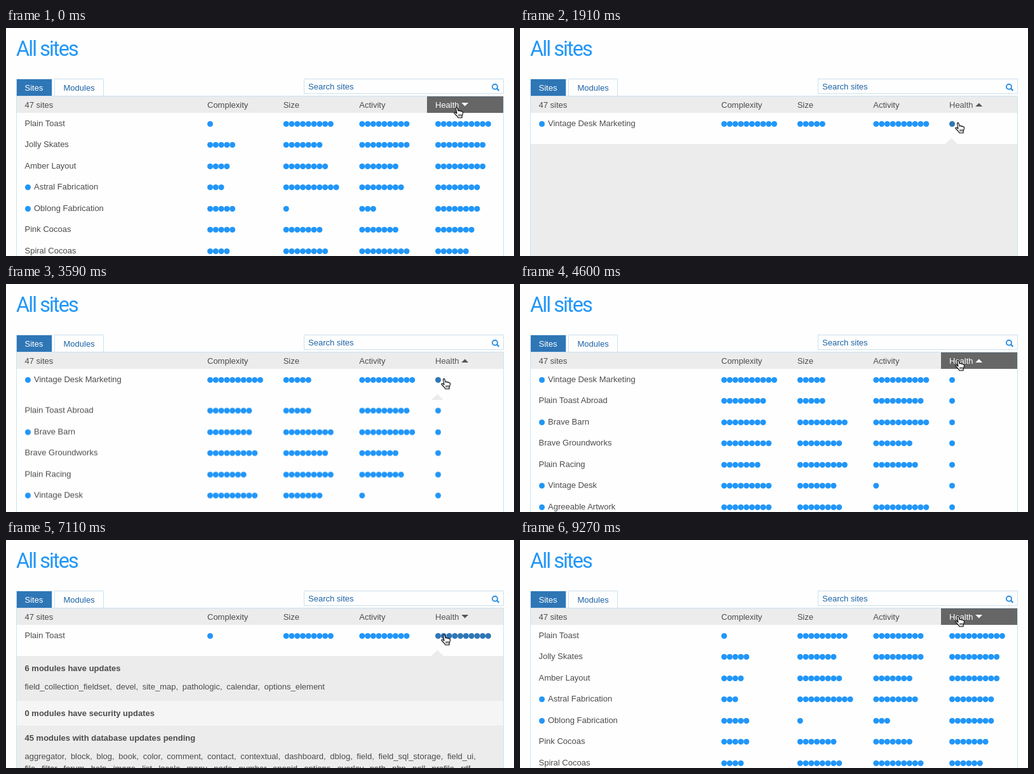
Animation, 800 px wide and 360 px high, one loop 9930 ms. Source, as an HTML page:

```html
<!DOCTYPE html>
<html lang="en">
<head>
<meta charset="utf-8">
<title>All sites</title>
<style>
html, body { margin: 0; width: 100%; height: 100%; overflow: hidden; background: #fefefe; }
svg { display: block; width: 800px; height: 360px; }
text { font: 13px "Liberation Sans", Arial, sans-serif; fill: #4c4c4c; white-space: pre; }
.title { font: 32.5px Roboto, sans-serif; letter-spacing: -1.95px; fill: #2196f8; }
.link { fill: #1c64a6; }
.white { fill: #fff; }
.line { fill: none; stroke: #cbe1f0; }
.dot { fill: #2196f8; }
.bold { font-weight: bold; }
.modules { word-spacing: 3px; }

/* Every part shares one 9930 ms loop and changes in hard steps. */
.move { animation: 9930ms step-end infinite; }
.asc { animation-name: asc; }
.desc { animation-name: desc; }
.active { animation-name: active; }
.label { animation-name: label; }
.rest { animation-name: rest; }
.panel { animation-name: panel; }
.notch { animation-name: notch; }
.updates { animation-name: updates; }
.report { animation-name: report; }
.hot { animation-name: hot; }
.cursor { animation-name: cursor; }

@keyframes asc { 0%, 51.762% { opacity: 0 } 7.855% { opacity: 1 } 100% { opacity: 0 } }
@keyframes desc { 0%, 51.762% { opacity: 1 } 7.855% { opacity: 0 } 100% { opacity: 1 } }
@keyframes active {
  0%, 45.821%, 92.749%, 100% { opacity: 1 }
  11.38%, 59.617% { opacity: 0 }
}
@keyframes label {
  0%, 45.821%, 92.749%, 100% { fill: #fff }
  11.38%, 59.617% { fill: #555 }
}
@keyframes rest {
  0%, 36.757%, 83.082%, 100% { opacity: 1; transform: none }
  19.235%, 67.372% { opacity: 0; transform: none }
  36.153% { opacity: 1; transform: translateY(15.5px) }
}
@keyframes panel {
  0%, 36.153%, 83.082%, 100% { opacity: 0 }
  19.235%, 67.372% { opacity: 1 }
}
@keyframes notch {
  0%, 36.757%, 83.082%, 100% { opacity: 0 }
  19.235%, 67.372% { opacity: 1 }
}
@keyframes updates { 0%, 36.153%, 100% { opacity: 0 } 23.464% { opacity: 1 } }
@keyframes report { 0%, 83.082%, 100% { opacity: 0 } 71.601% { opacity: 1 } }
@keyframes hot {
  0%, 44.612%, 92.145%, 100% { fill: #2196f8 }
  12.588%, 60.725% { fill: #2f76b6 }
}
@keyframes cursor {
  0% { transform: translate(705px, 125px) }
  10.775% { transform: translate(701px, 130px) }
  11.38% { transform: translate(697px, 135px) }
  11.984% { transform: translate(693px, 140px) }
  12.588% { transform: translate(689px, 145px) }
  13.192% { transform: translate(686px, 150px) }
  15.005%, 60.725% { transform: translate(685px, 149px) }
  44.612%, 60.121% { transform: translate(685px, 142px) }
  45.217%, 59.617% { transform: translate(685px, 135px) }
  45.821%, 59.013% { transform: translate(685px, 127px) }
  46.324%, 93.353% { transform: translate(685px, 120px) }
  92.145% { transform: translate(685px, 139px) }
  92.749% { transform: translate(685px, 130px) }
  100% { transform: translate(705px, 125px) }
}
</style>
</head>
<body>
<svg viewBox="0 0 800 360">
  <text class="title" x="16" y="44">All sites</text>

  <rect x="17" y="81" width="55" height="27" fill="#2f76b6"/>
  <path class="line" d="M16.5 360V80.5H72.5V107.5M76.5 107.5V80.5H153.5V107.5M16 107.5H783.5V360"/>
  <text class="white" x="29.5" y="99">Sites</text>
  <text class="link" x="90.5" y="99">Modules</text>

  <rect class="line" x="469.5" y="80.5" width="314" height="23"/>
  <text class="link" x="476" y="97">Search sites</text>
  <path d="M773 95.5L776.3 98.8" stroke="#2a8fe6" stroke-width="2.4"/>
  <circle cx="770" cy="92.7" r="4" fill="none" stroke="#2a8fe6" stroke-width="1.9"/>

  <rect x="17" y="108" width="766" height="26" fill="#ececec"/>
  <rect class="move active" x="663" y="108" width="120" height="26" fill="#666"/>
  <text x="29.5" y="126">47 sites</text>
  <text x="317" y="126">Complexity</text>
  <text x="436.7" y="126">Size</text>
  <text x="556.3" y="126">Activity</text>
  <g class="move label">
    <text style="fill:inherit" x="676" y="126">Health</text>
    <path class="move desc" d="M717.2 118H728.2L722.7 123.4Z"/>
    <path class="move asc" d="M717.2 124H728.2L722.7 118.6Z"/>
  </g>

  <g id="desc" class="move desc"></g>
  <g id="asc" class="move asc"></g>

  <path class="move notch" d="M670 183L679.5 173.7L689 183Z" fill="#ececec"/>
  <rect class="move panel" x="17" y="183" width="766" height="177" fill="#ececec"/>
  <g id="updates" class="move updates"></g>
  <g id="report" class="move report">
    <rect x="17" y="254" width="766" height="39" fill="#f5f5f5"/>
  </g>

  <g class="move cursor" stroke="#000" stroke-linejoin="round">
    <path fill="#fff" stroke-width="1.1" d="M3.5 2C3.3 .2 5.4 .2 5.9 1.6L7.2 6C8 5 9.6 5.2 9.8 6.3C10.6 5.5 12 5.8 12.2 6.9C13.4 6.4 14.5 7 14.5 8.4C14.5 11 14 12 13.2 13.5L13 16.7H6.8C6.2 14.5 4.5 13 2.8 11.5L1 9.6C.3 8.6 1.4 7.6 2.6 8.2L5 10Z"/>
    <path fill="none" stroke-width=".9" d="M8 11v3.5M10 11v3.5M12 11v3.5"/>
  </g>
</svg>
<script>
const NS = 'http://www.w3.org/2000/svg';
const left = 29.5;
const columns = [317, 436.7, 556.3, 676];

// Name (a leading * marks a flagged site), then complexity, size, activity, health.
const lists = {
  desc: [
    ['Plain Toast', 1, 9, 9, 10],
    ['Jolly Skates', 5, 7, 9, 9],
    ['Amber Layout', 4, 8, 7, 9],
    ['*Astral Fabrication', 3, 10, 8, 8],
    ['*Oblong Fabrication', 5, 1, 3, 8],
    ['Pink Cocoas', 5, 7, 7, 7],
    ['Spiral Cocoas', 4, 8, 9, 6]
  ],
  asc: [
    ['*Vintage Desk Marketing', 10, 5, 10, 1],
    ['Plain Toast Abroad', 8, 5, 9, 1],
    ['*Brave Barn', 8, 9, 10, 1],
    ['Brave Groundworks', 9, 8, 7, 1],
    ['Plain Racing', 7, 9, 8, 1],
    ['*Vintage Desk', 9, 7, 1, 1],
    ['*Agreeable Artwork', 9, 8, 10, 1]
  ]
};

const updates = [
  'colorbox, table_element, registration, mimemail, libraries, pathologic, calendar, spamspan, seo_checklist, menu_block,',
  'views, panels_extra_layouts, media, linkit, recaptcha, filefield_paths, ds, pathauto_persist, config_perms, uuid, varnish,',
  'field_group, webform_validation, link, xmlsitemap, site_map, date, field_collection, metatag, field_collection_fieldset,',
  'field_collection_table, entity, node_clone, pathauto, honeypot, memcache, transliteration, cck, mailsystem,',
  'options_element, phone, flexslider, plupload, hierarchical_select, context, features, views_field_view, mediaelement,',
  'google_analytics, devel, select_or_other, cas_attributes, captcha, views_data_export, auto_image_style, views_accordion,',
  'checklistapi, wysiwyg_codemagic, entitycache, filefield_sources, jquery_update'
];
const pending = [
  'aggregator, block, blog, book, color, comment, contact, contextual, dashboard, dblog, field, field_sql_storage, field_ui,',
  'file, filter, forum, help, image, list, locale, menu, node, number, openid, options, overlay, path, php, poll, profile, rdf,'
];

function add(parent, tag, attrs, content = '') {
  const el = document.createElementNS(NS, tag);
  for (const key in attrs) el.setAttribute(key, attrs[key]);
  el.textContent = content;
  return parent.appendChild(el);
}

function addDot(parent, x, y) {
  add(parent, 'circle', { cx: x + 4.5, cy: y, r: 4.5 });
}

function addRow(parent, [name, ...scores], index) {
  const base = Math.floor(155 + 33.5 * index);
  const flagged = name[0] === '*';
  const marks = add(parent, 'g', { class: 'dot' });
  if (flagged) addDot(marks, 30, base - 3.5);
  add(parent, 'text', { x: flagged ? 44 : left, y: base }, name.replace('*', ''));
  scores.forEach((score, col) => {
    const hot = index === 0 && col === 3;
    const group = add(parent, 'g', { class: hot ? 'move hot' : 'dot' });
    for (let i = 0; i < score; i++) addDot(group, columns[col] + 8.77 * i, base - 3.5);
  });
}

function addHeading(parent, y, content) {
  add(parent, 'text', { x: left, y, class: 'bold' }, content);
}

function addModules(parent, y, lines) {
  lines.forEach((line, i) =>
    add(parent, 'text', { x: left, y: Math.round(y + 19.1 * i), class: 'modules' }, line));
}

for (const id in lists) {
  const list = document.getElementById(id);
  const rest = add(list, 'g', { class: 'move rest' });
  lists[id].forEach((row, i) => addRow(i ? rest : list, row, i));
}

const first = document.getElementById('updates');
addHeading(first, 207, '61 modules have updates');
addModules(first, 236, updates);

const second = document.getElementById('report');
addHeading(second, 207, '6 modules have updates');
addModules(second, 236, ['field_collection_fieldset, devel, site_map, pathologic, calendar, options_element']);
addHeading(second, 278, '0 modules have security updates');
addHeading(second, 317, '45 modules with database updates pending');
addModules(second, 346, pending);
</script>
</body>
</html>
```
